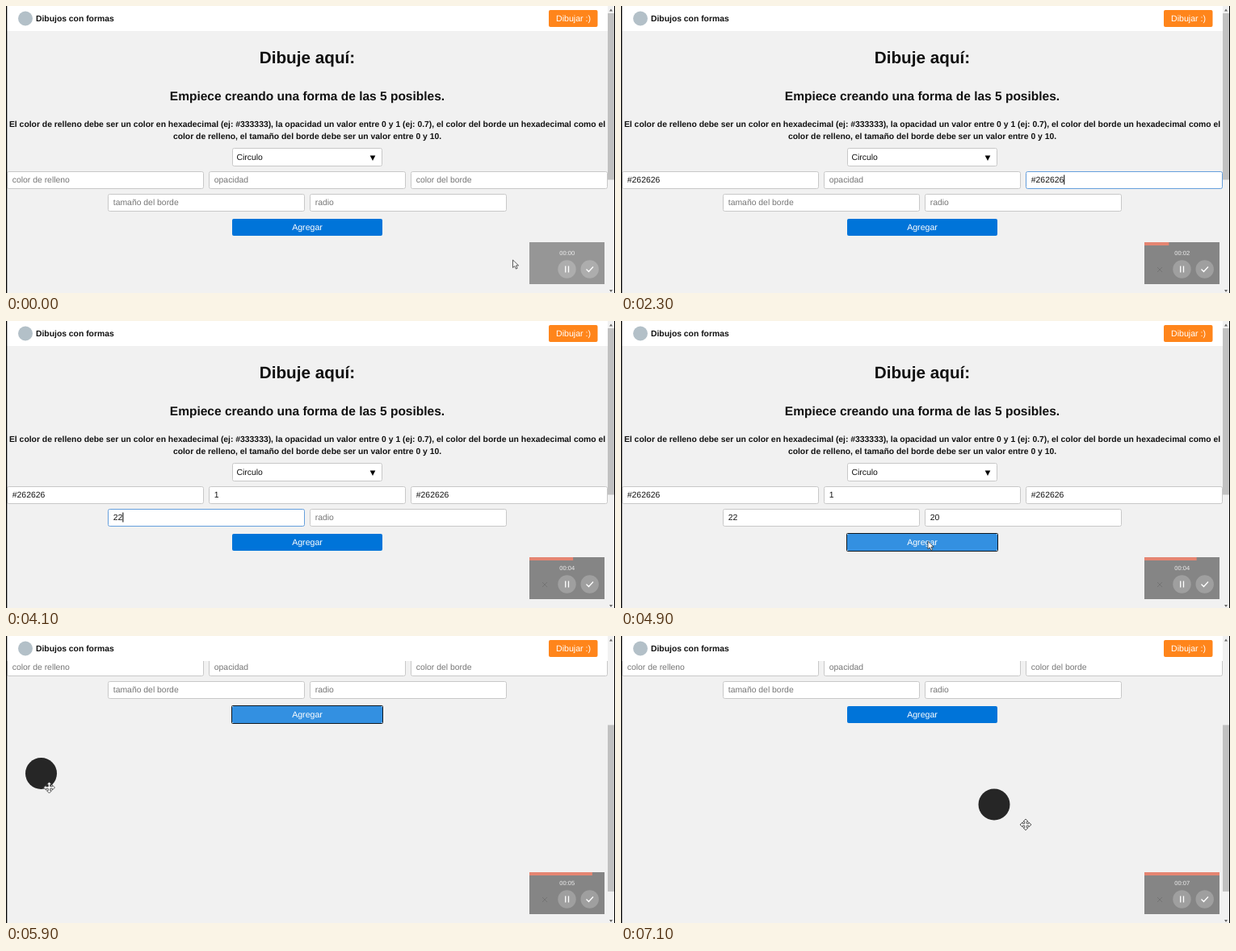
Animation, 754 px wide and 356 px high, one loop 7200 ms. Source, as an HTML page:

```html
<!DOCTYPE html>
<html lang="es">
<head>
<meta charset="utf-8">
<title>Dibujos con formas</title>
<style>
  html, body { margin: 0; height: 100%; overflow: hidden; background: #f1f1f1; }
  svg { display: block; width: 754px; height: 356px; }
  text { font: 10.4px "Liberation Sans", Arial, sans-serif; fill: #111; text-rendering: geometricPrecision; white-space: pre; }
  .bold { font-weight: bold; font-size: 10.36px; }
  .mid { text-anchor: middle; }
  .light { fill: #fff; font-size: 10.6px; }
  .box { fill: #fff; stroke: #c8c8c8; stroke-width: 1; }
  .pointer { fill: #fff; stroke: #333; stroke-width: .8; stroke-linejoin: round; }
</style>
</head>
<body>
<svg viewBox="0 0 754 356">
  <rect width="754" height="356" fill="#f1f1f1"/>
  <g id="page">
    <text class="bold mid" x="373" y="70.5" style="font-size:20.7px">Dibuje aquí:</text>
    <text class="bold mid" x="373" y="117" style="font-size:15.5px">Empiece creando una forma de las 5 posibles.</text>
    <text class="bold mid" x="373" y="150">El color de relleno debe ser un color en hexadecimal (ej: #333333), la opacidad un valor entre 0 y 1 (ej: 0.7), el color del borde un hexadecimal como el</text>
    <text class="bold mid" x="373" y="165.4">color de relleno, el tamaño del borde debe ser un valor entre 0 y 10.</text>
    <rect class="box" x="280.5" y="176.5" width="185" height="22" rx="2"/>
    <text x="285.5" y="191">Circulo</text>
    <path d="M450.7 185.5h6.6l-3.3 6.5z"/>
    <g id="fields"></g>
    <rect id="add" x="280" y="264" width="186" height="21" rx="2"/>
    <rect id="outline" x="279.5" y="263.5" width="187" height="22" rx="1" fill="none" stroke="#101820"/>
    <text class="light mid" x="373" y="278">Agregar</text>
  </g>
  <circle id="shape" r="19.5" fill="#262626"/>
  <g>
    <rect width="745" height="31" fill="#fff"/>
    <circle cx="24" cy="15.5" r="9" fill="#b3c0c8"/>
    <text class="bold" x="37" y="19.2">Dibujos con formas</text>
    <rect x="672" y="5" width="60.5" height="21" rx="2" fill="#ff851b"/>
    <text class="light mid" x="702.5" y="19.2">Dibujar :)</text>
  </g>
  <rect x="745" width="8" height="356" fill="#f1f1f1"/>
  <path d="M747 6.5h4l-2-3zM747 352h4l-2 3z" fill="#666"/>
  <rect id="thumb" x="745" width="8" height="206.5" fill="#c1c1c1"/>
  <path d="M0 0h1.3v356H0zM753 0h1v356h-1z"/>
  <path id="arrow" class="pointer" d="M0 0v9.6l2.3-2 1.6 3.5 1.7-.8-1.6-3.4h3.1z"/>
  <path id="move" class="pointer" d="M0-7l3 3.2H1.2v2.6h2.6V-3L7 0 3.8 3V1.2H1.2v2.6H3L0 7l-3-3.2h1.8V1.2h-2.6V3L-7 0l3.2-3v1.8h2.6v-2.6H-3z"/>
  <g>
    <rect id="panel" x="648" y="293" width="93" height="52"/>
    <rect id="progress" x="648" y="293" height="4" fill="#e58572"/>
    <text id="clock" class="mid" x="694.7" y="309.3" style="font-size:7.5px;fill:#eee"></text>
    <path id="cross" d="M664 324l6 6m0-6l-6 6" stroke="#000" stroke-opacity=".12"/>
    <g fill="#fff" fill-opacity=".22"><circle cx="694.5" cy="326.5" r="11.2"/><circle cx="722.7" cy="326.5" r="11.2"/></g>
    <path d="M692.7 322.5v8m3.8-8v8M718.5 326.5l3 3 5.5-6" fill="none" stroke="#fff" stroke-width="1.3"/>
  </g>
</svg>
<script>
const LOOP = 7200, SUBMIT = 4950, GRAB = 5950;
const $ = id => document.getElementById(id);
const set = (el, attrs) => { for (const k in attrs) el.setAttribute(k, attrs[k]); return el; };
const make = (tag, parent, attrs) =>
  parent.appendChild(set(document.createElementNS("http://www.w3.org/2000/svg", tag), attrs));
const show = (el, on) => el.style.display = on ? "" : "none";

// Linear interpolation through [time, ...values] keys
function track(keys, t) {
  const i = keys.findIndex(k => k[0] > t);
  if (i === 0) return keys[0].slice(1);
  if (i < 0) return keys[keys.length - 1].slice(1);
  const a = keys[i - 1], b = keys[i], p = (t - a[0]) / (b[0] - a[0]);
  return a.slice(1).map((v, n) => v + (b[n + 1] - v) * p);
}

const scrollKeys = [[5000, 0], [5300, 91], [5550, 177]];
const shapeKeys = [[GRAB, 43.5, 347.5], [6150, 120, 373], [6400, 250, 399], [6800, 364, 388], [7100, 462, 386], [7200, 491.5, 394]];
const mouseKeys = [[200, 627.5, 315], [850, 150, 215], [4600, 480, 243], [4850, 385, 275],
                   [5000, 370, 270], [5300, 229.5, 234.7], [5500, 215, 232], [5850, 53.5, 188]];

// focus/blur: active span; type: first key; pace: ms per character (0 = pasted)
const fields = [
  { x: 1.5, y: 205, hint: "color de relleno", value: "#262626", focus: 850, blur: 1950, type: 1000, pace: 90 },
  { x: 251.5, y: 205, hint: "opacidad", value: "1", focus: 2600, blur: 3400, type: 2800, pace: 100 },
  { x: 501.5, y: 205, hint: "color del borde", value: "#262626", focus: 1950, blur: 2600, type: 2150, pace: 0 },
  { x: 126.5, y: 233, hint: "tamaño del borde", value: "22", focus: 3400, blur: 4250, type: 3700, pace: 200 },
  { x: 376.5, y: 233, hint: "radio", value: "20", focus: 4250, blur: 4900, type: 4400, pace: 150 }
];
for (const f of fields) {
  const g = $("fields");
  f.box = make("rect", g, { class: "box", x: f.x, y: f.y + .5, width: 243, height: 21, rx: 2 });
  f.text = make("text", g, { x: f.x + 6.3, y: f.y + 14 });
  f.caret = make("rect", g, { y: f.y + 4.5, width: 1, height: 12 });
}

function drawField(f, t) {
  const count = t < f.type || t >= SUBMIT ? 0 : f.pace ? 1 + Math.floor((t - f.type) / f.pace) : f.value.length;
  const typed = f.value.slice(0, count), active = t >= f.focus && t < f.blur;
  f.text.textContent = typed || f.hint;
  f.text.style.fill = typed ? "#111" : "#757575";
  f.box.style.stroke = active && t > f.focus + 80 ? "#659fdc" : "";
  show(f.caret, active);
  if (active) set(f.caret, { x: f.x + 6.3 + (typed ? f.text.getComputedTextLength() : 0) });
}

function draw(t) {
  const [scroll] = track(scrollKeys, t);
  const at = (x, y) => ({ transform: `translate(${x} ${y})` });
  set($("page"), at(0, -scroll));
  set($("thumb"), { y: 9 + scroll * .573 });
  fields.forEach(f => drawField(f, t));

  const lit = t >= 4800 && t < GRAB;
  set($("add"), { fill: lit ? "#3390e1" : "#0074d9" });
  show($("outline"), lit && t >= 4900);

  const [x, y] = track(shapeKeys, t);
  show($("shape"), t >= SUBMIT);
  set($("shape"), at(x, y - scroll));

  // While dragging, the shape trails the pointer by 100 ms
  const [aheadX, aheadY] = track(shapeKeys, t + 100);
  const [mouseX, mouseY] = track(mouseKeys, t);
  const dragging = t >= GRAB;
  show($("arrow"), t < 850 || t >= 4700 && t < 5850);
  show($("move"), t >= 5850);
  set($("arrow"), at(mouseX, mouseY));
  set($("move"), dragging ? at(aheadX + 9.5, aheadY - scroll + 17) : at(mouseX, mouseY));

  set($("panel"), { fill: t < 100 ? "#969696" : "#858585" });
  set($("progress"), { width: Math.min(93, t * .0132) });
  show($("cross"), t >= 100);
  $("clock").textContent = "00:0" + Math.floor(t / 1000);
}

function tick() {
  draw(Math.floor(performance.now() % LOOP / 100) * 100);
  requestAnimationFrame(tick);
}
tick();
</script>
</body>
</html>
```
